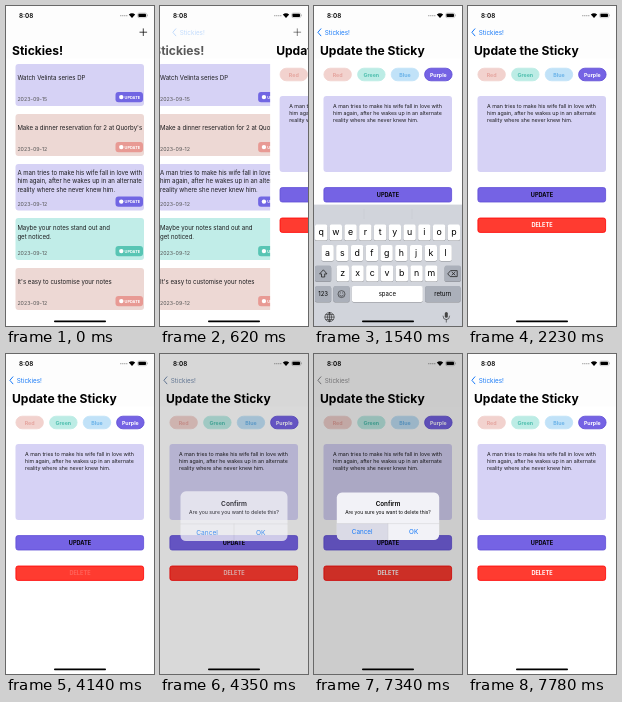
Recreate the animation shown at these times as an HTML page. Size 148 px wide and 320 px high, loop 8000 ms.

```html
<!DOCTYPE html>
<html lang="en">
<head>
<meta charset="utf-8">
<title>Sticky notes</title>
<style>
  html, body { margin: 0; height: 100%; overflow: hidden; background: #fff; }
  svg { display: block; width: 100%; height: 100%; font-family: Inter, sans-serif; }
</style>
</head>
<body>
<svg id="stage" viewBox="0 0 148 320"></svg>
<script>
const LOOP = 8000;
const W = 148;
const PURPLE = '#7563e4', PURPLE_EDGE = '#5f4cd6', LAVENDER = '#d6d2f5';
const STORY = [
  'A man tries to make his wife fall in love with',
  'him again, after he wakes up in an alternate',
  'reality where she never knew him.'
];

// Markup helpers
const text = (x, y, str, size, attrs = '') =>
  `<text x="${x}" y="${y}" font-size="${size}" ${attrs}>${str}</text>`;
const centred = (x, y, str, size, attrs = '') =>
  text(x, y, str, size, `text-anchor="middle" ${attrs}`);
const rect = (x, y, w, h, fill, r = 0, attrs = '') =>
  `<rect x="${x}" y="${y}" width="${w}" height="${h}" rx="${r}" fill="${fill}" ${attrs}/>`;
const bordered = (x, y, w, h, fill, r, edge) =>
  rect(x + .4, y + .4, w - .8, h - .8, fill, r, `stroke="${edge}" stroke-width=".8"`);
const line = (d, attrs = '') =>
  `<path d="${d}" fill="none" stroke-linecap="round" stroke-linejoin="round" ${attrs}/>`;
const group = (id, ...parts) => `<g id="${id}">${parts.join('')}</g>`;
const title = str => text(6, 48.5, str, 12.1, 'font-weight="700"');

// Notes list
const themes = {
  purple: [LAVENDER, '#7166e3'],
  pink: ['#edd8d4', '#e89a94'],
  teal: ['#c1ede8', '#58c5b4']
};
const notes = [
  { y: 58, h: 42, theme: 'purple', date: '2023-09-15', lines: ['Watch Velinta series DP'] },
  { y: 108, h: 42, theme: 'pink', date: '2023-09-12', lines: ["Make a dinner reservation for 2 at Quorby's"] },
  { y: 158, h: 46.5, theme: 'purple', date: '2023-09-12', lines: STORY },
  { y: 212, h: 42, theme: 'teal', date: '2023-09-12', lines: ['Maybe your notes stand out and', 'get noticed.'] },
  { y: 262, h: 42, theme: 'pink', date: '2023-09-12', lines: ["It's easy to customise your notes"] }
];

function noteCard({ y, h, theme, date, lines }, i) {
  const [paper, accent] = themes[theme];
  const bottom = y + h;
  const first = y + [0, 16.3, 12.2, 10.6][lines.length];
  return rect(9.5, y, 128.5, h, paper, 3) +
    lines.map((str, n) => text(11.4, first + n * 8.7, str, 6.07, 'fill="#1c1c1e"')).join('') +
    text(11.4, bottom - 4.8, date, 5.3, 'fill="#555"') +
    group('chip' + i,
      rect(109.5, bottom - 14, 27.5, 10.2, accent, 3),
      `<circle cx="115.3" cy="${bottom - 8.9}" r="2.2" fill="#fff"/>`,
      text(118.6, bottom - 7.5, 'UPDATE', 3.9, 'font-weight="700" fill="#fff"'));
}

// Editor page
const pill = (x, label, fill, ink, edge = fill) =>
  bordered(x, 61.8, 28.3, 13.4, fill, 6.3, edge) +
  centred(x + 14.15, 70.5, label, 5.3, `font-weight="700" fill="${ink}"`);
const button = (y, label, fill, edge, attrs = '') =>
  bordered(9.5, y, 128.5, 15.2, fill, 2.2, edge) +
  centred(74, y + 9.7, label, 5.6, `font-weight="700" ${attrs}`);

const editor = [
  rect(0, 0, W, 320, '#fff'),
  pill(9.5, 'Red', '#f2d2ce', '#e5a59f'),
  pill(43.2, 'Green', '#bcece5', '#4fbfae'),
  pill(76.8, 'Blue', '#c1e2f8', '#6bb2e8'),
  pill(110.2, 'Purple', PURPLE, '#fff', PURPLE_EDGE),
  rect(9.5, 90, 128.5, 76, LAVENDER, 3),
  STORY.map((str, n) => text(19, 102.3 + n * 6.6,
    str + (n === 2 ? '<tspan id="caret" font-weight="600" fill="#3a4fd0">|</tspan>' : ''),
    5.3, 'fill="#1c1c1e"')).join(''),
  button(181.2, 'UPDATE', PURPLE, PURPLE_EDGE),
  button(211.6, 'DELETE', '#ff3b30', '#ff0000', 'id="deleteLabel" fill="#fff"')
];

// Keyboard, drawn in its docked position
const key = (x, y, w, fill = '#fff') =>
  rect(x, y + .5, w, 16, '#898b90', 1.8) + rect(x, y, w, 16, fill, 1.8);

function letterRow(letters, left, y) {
  return [...letters].map((ch, i) => {
    const x = left + i * 14.75;
    return key(x, y, 12.4) + centred(x + 6.2, y + 10.8, ch, 8.8);
  }).join('');
}

const GREY_KEY = '#abb0ba';
const icon = 'stroke="#222" stroke-width=".8"';
const face = 'stroke="#222" stroke-width=".6"';
const ring = (x, y, r) => `<circle cx="${x}" cy="${y}" r="${r}" fill="none" ${face}/>`;
const keyboard = [
  rect(0, 192, W, 128, '#d1d4db'),
  line('M50 197V206M98 197V206', 'stroke="#c2c5cc" stroke-width=".4"'),
  letterRow('qwertyuiop', .9, 212),
  letterRow('asdfghjkl', 7.4, 232.5),
  letterRow('zxcvbnm', 22.6, 253),
  key(1, 253, 16.2, GREY_KEY), key(130.6, 253, 16.2, GREY_KEY),
  line('M9.1 257.5L5.6 261.3H7.5V264.4H10.7V261.3H12.6Z', icon),
  line('M134 261L136.6 258H143.2V264H136.6ZM138 259.6L141 262.4M141 259.6L138 262.4', icon),
  key(1, 273.5, 16.2, GREY_KEY), key(19.4, 273.5, 16.2, GREY_KEY),
  key(37.8, 273.5, 71, '#fff'), key(111.1, 273.5, 35.5, GREY_KEY),
  centred(9.1, 283.5, '123', 6),
  ring(27.5, 281.5, 3.5),
  line('M25.5 282.3Q27.5 285.3 29.5 282.3M26.3 280.2V280.5M28.7 280.2V280.5', face),
  centred(73.3, 283.5, 'space', 6), centred(128.8, 283.5, 'return', 6),
  ring(15.5, 304.5, 4.6),
  line('M10.9 304.5H20.1M15.5 299.9V309.1M11.8 302H19.2M11.8 307H19.2M15.5 299.9Q11 304.5 15.5 309.1Q20 304.5 15.5 299.9', face),
  rect(130.8, 299.5, 3, 5.6, '#444', 1.5),
  line('M129 303.5Q129 307 132.3 307Q135.6 307 135.6 303.5M132.3 307V309.5', face)
];

// Confirmation dialog
const BLUE = '#1679f8';
const dialog = [
  rect(22.8, 138.4, 102.4, 47.6, '#f2f2f7', 5.2),
  group('cancelPress', '<path d="M22.8 169.6H74V186H28Q22.8 186 22.8 180.8Z" fill="#dadae6"/>'),
  centred(74, 152, 'Confirm', 6.3, 'font-weight="600"'),
  centred(74, 159.7, 'Are you sure you want to delete this?', 4.93),
  line('M22.8 169.6H125.2M74 169.6V186', 'stroke="#c8c8cb" stroke-width=".4"'),
  centred(48.2, 180.2, 'Cancel', 6.3, `fill="${BLUE}"`),
  centred(99.6, 180.2, 'OK', 6.3, `fill="${BLUE}"`)
];

const statusBar = [
  text(13, 11.6, '8:08', 6.3, 'font-weight="600"'),
  [114.8, 116.8, 118.8, 120.8].map(x => `<circle cx="${x}" cy="9.7" r=".65" fill="#999"/>`).join(''),
  '<path d="M126 12L122.8 8.5Q126 5.9 129.2 8.5Z"/>',
  rect(131.7, 7.1, 9, 4.6, 'none', 1.3, 'stroke="#888" stroke-width=".4"'),
  rect(132.4, 7.8, 7.6, 3.2, '#000', .8),
  rect(141.2, 8.6, .5, 1.6, '#888', .25)
];

document.getElementById('stage').innerHTML = [
  rect(0, 0, W, 320, '#fff'),
  group('list', notes.map(noteCard).join('')),
  group('editor', ...editor),
  rect(0, 0, W, 52.5, '#fdfdfd'),
  group('listTitle', title('Stickies!')),
  group('plus', line('M133.9 26.2H140.7M137.3 22.8V29.6', 'stroke="#111" stroke-width=".8"')),
  group('editorTitle', title('Update the Sticky')),
  group('back',
    line('M6.9 22.8L3.9 26.3L6.9 29.8', 'stroke="currentColor" stroke-width="1"'),
    text(10.8, 28.6, 'Stickies!', 6.3, 'fill="currentColor"')),
  ...statusBar,
  group('keyboard', ...keyboard),
  rect(48, 314.6, 52, 1.6, '#000', .8),
  group('shade', rect(0, 0, W, 320, '#000')),
  group('dialog', ...dialog)
].join('');

// Motion
const el = id => document.getElementById(id);
const clamp = v => Math.min(1, Math.max(0, v));
const mix = (a, b, p) => a + (b - a) * p;
const easeOut = p => 1 - (1 - clamp(p)) ** 3;
const move = (id, x, y = 0) => el(id).setAttribute('transform', `translate(${x} ${y})`);
const fade = (id, opacity) => el(id).setAttribute('opacity', opacity);

// Critically damped spring from 0 to 1
function spring(ms) {
  const u = Math.max(0, ms) * .018;
  return 1 - (1 + u) * Math.exp(-u);
}

// Each burst of movement advances in even steps: [start, end, step count]
const bursts = [[500, 1300, 8], [1540, 2230, 7], [4140, 4680, 6], [7340, 7780, 5]];

function steppedTime(t) {
  let held = 0;
  for (const [start, end, count] of bursts) {
    if (t < start) break;
    const step = (end - start) / (count - 1);
    held = start + step * Math.min(count - 1, Math.floor((t - start + 6) / step));
  }
  return held;
}

function render(time) {
  const t = steppedTime(time);

  const push = spring(t - 560);
  const rest = 1 - push;
  move('list', -.3 * W * push);
  move('editor', W * rest);
  move('listTitle', -50 * push);
  move('editorTitle', W * rest);
  move('back', 12 * rest);
  fade('listTitle', clamp(1 - push * 1.4));
  fade('plus', clamp(1 - push * 1.4));
  fade('back', push);
  fade('chip2', t >= 500 && t < 600 ? .35 : 1);

  move('keyboard', W * (1 - spring(t - 670)), 129 * spring(t - 1520));
  el('caret').setAttribute('fill-opacity', t > 700 && t < 1540 ? 1 : 0);

  const pressed = t >= 4140 && t < 4700;
  fade('deleteLabel', pressed ? mix(.2, 1, clamp((t - 4160) / 300)) : 1);

  const opening = easeOut((t - 4200) / 420);
  const shown = opening * (1 - easeOut((t - 7400) / 370));
  const scale = mix(1.18, 1, opening);
  fade('shade', .2 * shown);
  fade('dialog', shown);
  el('dialog').setAttribute('transform',
    `translate(74 162) scale(${scale}) translate(-74 -162)`);
  fade('cancelPress', t >= 7340 ? 1 : 0);
  el('back').setAttribute('color',
    `rgb(${mix(22, 140, shown)},${mix(121, 140, shown)},${mix(248, 143, shown)})`);
}

function tick() {
  render(performance.now() % LOOP);
  requestAnimationFrame(tick);
}
tick();
</script>
</body>
</html>
```
